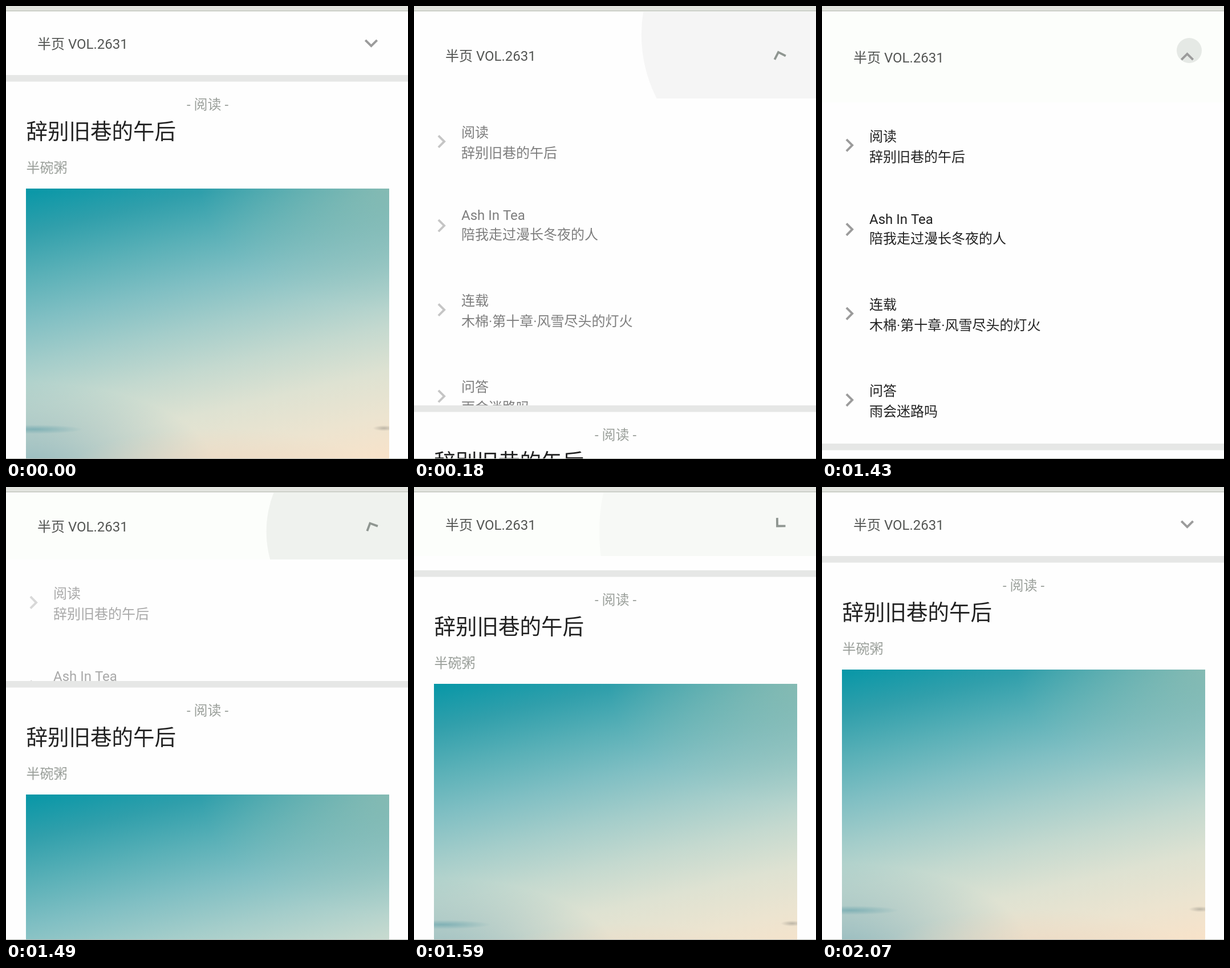
These frames come from a looping animation (705x794 px, 2100 ms). An HTML page with a canvas:

```html
<!DOCTYPE html>
<html lang="zh-CN">
<head>
<meta charset="utf-8">
<title>Expansion panel</title>
<style>
html, body { margin: 0; width: 100%; height: 100%; overflow: hidden; background: #fefefe; }
canvas { display: block; width: 705px; height: 794px; }
</style>
</head>
<body>
<canvas id="stage" width="705" height="794"></canvas>
<script>
const W = 705, H = 794, LOOP = 2100;
const TOP = 9, CLOSED_H = 112, OPEN_H = 160, BODY_H = 598;
const ROW_H = 151.5, LATIN_TRIM = 8;
const FONT = 'Roboto, "Noto Sans CJK SC", "Noto Sans CJK", sans-serif';
const GREY = '#9a9f9a', ICON = '#9b9b9b';
const ctx = document.getElementById('stage').getContext('2d');

// begin/span: the panel's own clock; from/anchor/step/end: when the screen refreshes.
const OPENING = { begin: 53, span: 201, from: 90, anchor: 120, step: 60, end: 290,
  rippleAt: 85, x: 647, y: 50 };
const CLOSING = { begin: 1364, span: 303, from: 1430, anchor: 1490, step: 50, end: 1740,
  rippleAt: 1430, x: 644, y: 78 };

const ROWS = [
  ['阅读', '辞别旧巷的午后'],
  ['Ash In Tea', '陪我走过漫长冬夜的人'],
  ['连载', '木棉·第十章·风雪尽头的灯火'],
  ['问答', '雨会迷路吗']
];

const clamp = v => Math.max(0, Math.min(1, v));

// cubic-bezier(.4, 0, .2, 1)
function ease(x) {
  if (x <= 0 || x >= 1) return clamp(x);
  let lo = 0, hi = 1, s = .5;
  for (let i = 0; i < 24; i++) {
    s = (lo + hi) / 2;
    const u = 1 - s;
    if (1.2 * u * u * s + .6 * u * s * s + s * s * s < x) lo = s; else hi = s;
  }
  return 3 * (1 - s) * s * s + s * s * s;
}

function snap(t, m) {
  if (t < m.from || t >= m.end) return t;
  return Math.max(m.from, m.anchor + Math.floor((t - m.anchor) / m.step) * m.step);
}

function rect(x, y, w, h, color) {
  ctx.fillStyle = color;
  ctx.fillRect(x, y, w, h);
}

function clipTo(top, bottom) {
  ctx.beginPath();
  ctx.rect(0, top, W, bottom - top);
  ctx.clip();
}

function text(str, x, y, color, size = 24, align = 'left') {
  ctx.font = `${size}px ${FONT}`;
  ctx.textAlign = align;
  ctx.fillStyle = color;
  ctx.fillText(str, x, y);
}

function chevron(x, y, angle, color) {
  ctx.save();
  ctx.translate(x, y);
  ctx.rotate(angle);
  ctx.scale(1.93, 1.93);
  ctx.beginPath();
  [[4.59, -3.41], [0, 1.17], [-4.59, -3.41], [-6, -2], [0, 4], [6, -2]]
    .forEach(p => ctx.lineTo(...p));
  ctx.fillStyle = color;
  ctx.fill();
  ctx.restore();
}

function makeSky() {
  const w = 637, h = 490;
  const sky = document.createElement('canvas');
  sky.width = w;
  sky.height = h;
  const g = sky.getContext('2d');
  const base = g.createLinearGradient(0, 0, 135, 589);
  ['#0797a7', '#309fab', '#59b0b7', '#80bfc3', '#a4cdca', '#c4d9cf', '#dee2d2', '#ece4d0', '#f8e2c9']
    .forEach((color, i, all) => base.addColorStop(i / (all.length - 1), color));
  g.fillStyle = base;
  g.fillRect(0, 0, w, h);

  const glow = (x, y, rx, ry, rgb, alpha) => {
    g.save();
    g.translate(x, y);
    g.scale(rx, ry);
    const fill = g.createRadialGradient(0, 0, 0, 0, 0, 1);
    fill.addColorStop(0, `rgba(${rgb},${alpha})`);
    fill.addColorStop(1, `rgba(${rgb},0)`);
    g.fillStyle = fill;
    g.fillRect(-1, -1, 2, 2);
    g.restore();
  };
  glow(w, 0, 330, 210, '148,190,178', .75);
  glow(0, 490, 330, 150, '136,180,188', .85);
  glow(340, 490, 260, 70, '236,212,190', .6);
  glow(15, 422, 85, 8, '108,166,174', .7);
  glow(628, 420, 20, 5, '176,170,156', .8);
  return sky;
}

const sky = makeSky();

function state(t) {
  const closing = t >= CLOSING.from, m = closing ? CLOSING : OPENING;
  const waiting = t < (closing ? m.from + 1 : m.from);
  const k = waiting ? 0 : clamp((t - m.begin) / m.span);
  const size = closing ? 1 - ease(k) : ease(k);
  const u = closing ? 1 - k : k;
  return { size, turn: ease(u), fade: ease((u - .4) / .6) };
}

function drawRipple(t, bottom) {
  const m = t >= CLOSING.from ? CLOSING : OPENING;
  if (t < m.from || t >= m.end) return;
  const age = t - m.rippleAt;
  ctx.save();
  clipTo(TOP, bottom);
  if (m === CLOSING) rect(0, TOP, W, bottom - TOP, '#fcfefb');
  ctx.beginPath();
  ctx.arc(m.x, m.y, 22 + 380 * (1 - Math.exp(-age / 105)), 0, Math.PI * 2);
  ctx.fillStyle = `rgba(10,24,12,${.092 * Math.exp(-age / 105)})`;
  ctx.fill();
  ctx.restore();
}

function drawList(top, edge, alpha) {
  if (alpha <= 0) return;
  ctx.save();
  clipTo(0, edge);
  ctx.globalAlpha = alpha;
  for (const [label, title] of ROWS) {
    const trim = /^[A-Z]/.test(label) ? LATIN_TRIM : 0;
    const mid = top + (ROW_H - trim) / 2;
    chevron(48.1, mid - .7, -Math.PI / 2, ICON);
    text(label, 83, mid - 8.25 - trim / 4, '#222');
    text(title, 83, mid + 27.75 - trim / 2, '#222');
    top += ROW_H - trim;
  }
  ctx.restore();
}

function drawArticle(y) {
  rect(0, y, W, 11.5, '#e6e7e6');
  text('- 阅读 -', 353.5, y + 59.5, GREY, 24, 'center');
  text('辞别旧巷的午后', 35.5, y + 112, '#212121', 37.5);
  text('半碗粥', 35.5, y + 171, GREY);
  ctx.drawImage(sky, 35, y + 199);
}

function draw(t) {
  const s = state(t);
  const head = Math.max(CLOSED_H, 95.4 + (OPEN_H - 95.4) * s.size);
  const bottom = TOP + head, mid = TOP + head / 2;
  const edge = Math.round(bottom + BODY_H * s.size);

  rect(0, 0, W, H, '#fefefe');
  drawRipple(t, Math.round(bottom));
  text('半页 VOL.2631', 55, mid + 10, '#535553');
  chevron(640.5, mid, Math.PI * s.turn, s.turn > 0 && s.turn < 1 ? '#8f9691' : ICON);
  drawList(bottom, edge, s.fade);
  drawArticle(edge);

  rect(0, 0, W, 8, '#e2e4df');
  rect(0, 8, W, 1, '#b8bdb4');
  rect(0, 9, W, 1, '#eef0ec');
  rect(0, H - 1, W, 1, '#b4b7b2');
}

let start;
function loop(now) {
  if (start === undefined) start = now;
  draw(snap(snap((now - start) % LOOP, OPENING), CLOSING));
  requestAnimationFrame(loop);
}
draw(0);
requestAnimationFrame(loop);
</script>
</body>
</html>
```
